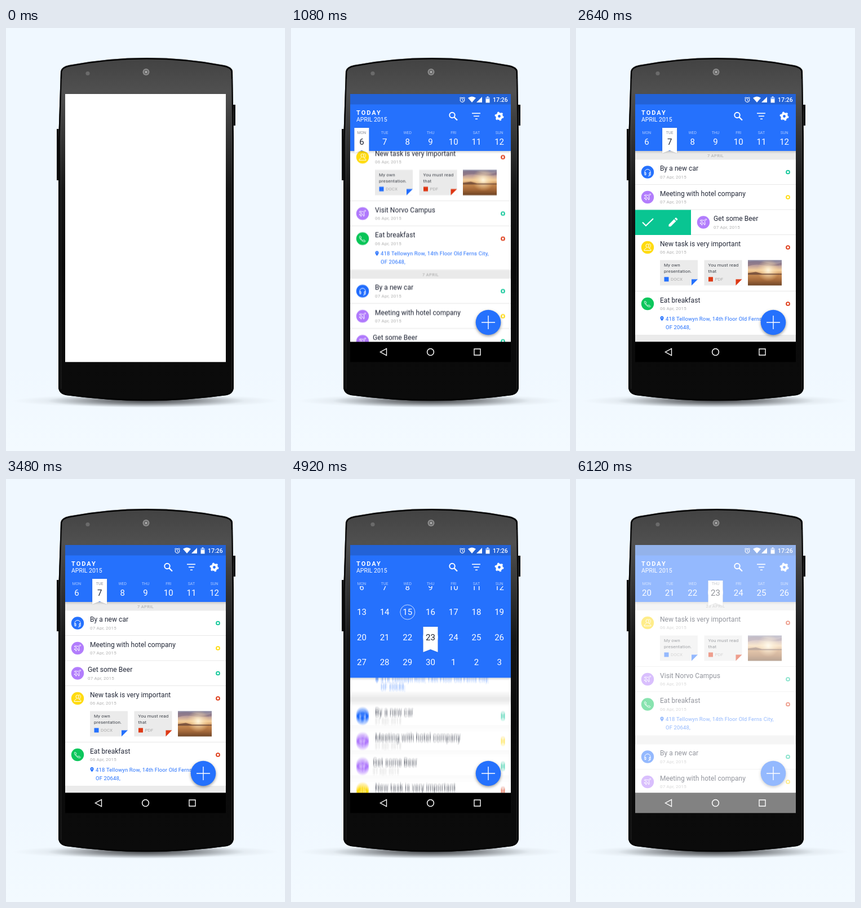
An HTML page with a canvas for the animation above (6.24 s loop, 495 px wide and 750 px high).

```html
<!DOCTYPE html>
<html lang="en">
<head>
<meta charset="utf-8">
<title>Task planner</title>
<style>
html, body { margin: 0; width: 100%; height: 100%; overflow: hidden; background: #f0f8ff; }
canvas { display: block; width: 495px; height: 750px; }
</style>
</head>
<body>
<canvas id="stage"></canvas>
<script>
const W = 495, H = 750, LOOP = 6240, STEP = 120;
const LEFT = 105, WIDTH = 285, TOP = 117, BOTTOM = 592.5, NAV = 556.5;
const BLUE = '#2571fd', RED = '#de3a16', GREEN = '#10c799', YELLOW = '#ffdb10', PURPLE = '#b27dfc';
const DAYS = ['MON', 'TUE', 'WED', 'THU', 'FRI', 'SAT', 'SUN'];
const ROW = 44.5;

const scale = window.devicePixelRatio || 1;
function prepare(canvas) {
  canvas.width = W * scale;
  canvas.height = H * scale;
  const context = canvas.getContext('2d');
  context.scale(scale, scale);
  return context;
}
const stage = prepare(document.getElementById('stage'));
const layer = prepare(document.createElement('canvas'));
let c = stage;

// Timing helpers
const clamp = k => Math.max(0, Math.min(1, k));
const part = (t, a, b) => clamp((t - a) / (b - a));
const ease = (t, a, b, power = 1) => {
  const k = part(t, a, b) ** power;
  return k * k * (3 - 2 * k);
};
const easeOut = (t, a, b) => 1 - (1 - part(t, a, b)) ** 2;

// Drawing helpers
function rect(x, y, w, h, color) {
  c.fillStyle = color;
  c.fillRect(x, y, w, h);
}
function disc(x, y, r, color) {
  c.fillStyle = color;
  c.beginPath();
  c.arc(x, y, r, 0, 7);
  c.fill();
}
function ring(x, y, r, color, width) {
  c.strokeStyle = color;
  c.lineWidth = width;
  c.beginPath();
  c.arc(x, y, r, 0, 7);
  c.stroke();
}
function path(d, x, y, color, width) {
  c.save();
  c.translate(x, y);
  const shape = new Path2D(d);
  if (width) {
    c.strokeStyle = color;
    c.lineWidth = width;
    c.stroke(shape);
  } else {
    c.fillStyle = color;
    c.fill(shape);
  }
  c.restore();
}
// y is the middle of the capital letters
function text(s, x, y, size, color, { spacing = 0, weight = 400, align = 'left' } = {}) {
  c.font = `${weight} ${size}px Roboto, sans-serif`;
  c.letterSpacing = spacing + 'px';
  c.textAlign = align;
  c.fillStyle = color;
  c.fillText(s, x, Math.round(y + size * .355));
}
function clipped(x, y, w, h, draw) {
  c.save();
  c.beginPath();
  c.rect(x, y, w, h);
  c.clip();
  draw();
  c.restore();
}
function fade(gradient, ...colors) {
  colors.forEach((color, i) => gradient.addColorStop(i / (colors.length - 1), color));
  return gradient;
}

// Task list
const GLYPHS = {
  people: 'M-3-3a2.6 3 0 1 1 5.2 0a2.6 3 0 0 1-5.2 0M-6 5.5c0-4 3.5-2.5 3.5-5M5-.5c0 2-3 .5-3 .5c0 3 4 1.5 4 5.5M-6 5.5h12M2-6c4-.5 4 3 2.5 5',
  plane: 'M5.5-5.5c-1.5-.8-3 1-4.2 2.2l-6-.8-1 1.3 4.2 2-2 2-1.8-.2-.7.9 2.2 1 1 2.2.9-.7-.2-1.8 2-2 2 4.2 1.3-1-.8-6c1.2-1.2 3.9-1.8 3.1-3.3z',
  phone: 'M-4.5-5c-2 1.5-.5 5 2 7.5s6 4 7.5 2l-2.5-2.5-1.8 1.2c-1.5-.6-3.4-2.5-4-4l1.2-1.7z',
  headset: 'M-5 2v-2a5 5 0 0 1 10 0v2M-5 1h2v4h-2zM5 1h-2v4h2zM5 5q-1 2-4 2'
};
const task = { title: 'New task is very important', date: '06', icon: 'people', color: YELLOW, mark: RED, height: 100, files: true };
const visit = { title: 'Visit Norvo Campus', date: '06', icon: 'plane', color: PURPLE, mark: GREEN };
const meal = { title: 'Eat breakfast', date: '06', icon: 'phone', color: '#0cc65c', mark: RED, height: 78, address: true };
const car = { title: 'By a new car', date: '07', icon: 'headset', color: BLUE, mark: GREEN };
const meeting = { title: 'Meeting with hotel company', date: '07', icon: 'plane', color: PURPLE, mark: YELLOW };
const beer = { title: 'Get some Beer', date: '07', icon: 'plane', color: PURPLE, mark: GREEN, x: 145 };
const bar = label => ({ label, height: 15 });
const week = [car, meeting, beer, task, meal];
const SWIPED = 7;
const rows = [bar(''), task, visit, meal, bar('7 APRIL'), ...week, bar(''), ...week,
  bar('23 APRIL'), task, visit, meal, bar(''), car, meeting, beer];

function drawCard(x, y, lines, kind, color) {
  rect(x, y, 67, 45, '#ebebeb');
  path('M56 45L67 34V45z', x, y, '#fff');
  path('M56 34H67L56 45z', x, y, color);
  lines.forEach((s, i) => text(s, x + 7, y + 9 + i * 11, 8, '#3c4048', { spacing: .2 }));
  rect(x + 7.5, y + 30, 8, 8, color);
  text(kind, x + 19, y + 34, 8, '#aaa');
}
function drawPhoto(x, y) {
  rect(x, y, 60, 45, fade(c.createLinearGradient(0, y, 0, y + 45),
    '#85849f', '#b79a9a', '#f4cf9c', '#c48750', '#a3683a', '#704728'));
  clipped(x, y, 60, 45, () => {
    path('M0 3Q20 0 34 5T60 4V9Q40 12 26 9T0 11z', x, y, 'rgba(120,100,125,.5)');
    disc(x + 36, y + 18, 20, fade(c.createRadialGradient(x + 36, y + 18, 1, x + 36, y + 18, 20),
      'rgba(255,246,220,.95)', 'rgba(255,215,150,0)'));
    path('M0 23L14 21L25 24H60V26H0z', x, y, 'rgba(90,55,45,.7)');
  });
}
function drawRow(row, y, height) {
  if (row.label !== undefined) {
    rect(LEFT, y, WIDTH, height, '#ebebeb');
    text(row.label, 247.5, y + 7.5, 7.5, '#a8a8a8', { spacing: .4, align: 'center' });
    return;
  }
  const x = row.x || 149;
  disc(127, y + 22, 11.2, row.color);
  path(GLYPHS[row.icon], 127, y + 22, '#fff', 1);
  text(row.title, x, y + 15.5, 12, '#232838', { spacing: .05 });
  text(row.date + ' Apr, 2015', x, y + 30.5, 8, '#b0b0b0', { spacing: .2 });
  ring(376, y + 22, 2.9, row.mark, 1.9);
  if (row.files) {
    drawCard(149, y + 44.5, ['My own', 'presentation.'], 'DOCX', BLUE);
    drawCard(227.5, y + 44.5, ['You must read', 'that'], 'PDF', RED);
    drawPhoto(305, y + 44.5);
  }
  if (row.address) {
    path('M0 4C-1 2-3 1-3-1.5a3 3 0 0 1 6 0C3 1 1 2 0 4zM-1-1.5a1 1 0 0 0 2 0a1 1 0 0 0-2 0z', 152.5, y + 48.5, BLUE);
    text('418 Tellowyn Row, 14th Floor Old Ferns City,', 159, y + 48.5, 9.5, BLUE, { spacing: .15 });
    text('OF 20648,', 159, y + 63.5, 9.5, BLUE, { spacing: .15 });
  }
  if (height >= ROW) rect(LEFT, y + height - 1, WIDTH, 1, '#e8e8e8');
}
function drawActions(y, width) {
  rect(LEFT, y, width, ROW, '#09c592');
  clipped(LEFT, y, width, ROW, () => {
    path('M-9 0L-3 6L10-6.5', 127, y + 22, '#fff', 2);
    path('M-7.5 7.5V4L2-5.5L5.5-2L-4 7.5zM3-6.5L4.5-8Q5.3-8.5 6-8L8-6Q8.5-5.3 8-4.5L6.5-3z', 172, y + 22, '#fff');
  });
}
function drawList(t, scroll, swipe) {
  rect(0, 0, W, H, '#fff');
  let y = 210 - scroll;
  rows.forEach((row, i) => {
    const tight = i === SWIPED && t < 1800;
    const height = tight ? 41 : row.height || ROW;
    if (y + height > 150 && y < 600) {
      const shift = i === SWIPED ? swipe : 0;
      c.save();
      c.translate(shift, 0);
      drawRow(row, y, height);
      c.restore();
      if (shift > 0) drawActions(y, shift);
    }
    y += height;
  });
}

// Header with calendar
const column = i => 125.4 + 40.7 * i;
function drawDates(bottom, shift, ink, labelInk) {
  DAYS.forEach((day, i) => text(day, column(i), 185.5, 7, labelInk, { align: 'center' }));
  clipped(LEFT, 190, WIDTH, bottom - 190, () => {
    for (let n = 0; n < 28; n++) {
      const x = column(n % 7), y = 201.2 + Math.floor(n / 7) * ROW - shift;
      const day = (n + 5) % 30 + 1;
      text(day, x, y, 15, ink, { align: 'center' });
      if (day === 15 || day === 23) ring(x, y, 13, 'rgba(255,255,255,.75)', 1);
    }
  });
}
function drawFlag(x, y, bottom, shift) {
  const flag = new Path2D(`M${x - 13} ${y}h26v45l-13-5l-13 5z`);
  c.save();
  c.shadowColor = 'rgba(0,0,0,.2)';
  c.shadowBlur = 2 * scale;
  c.fillStyle = '#fff';
  c.fill(flag);
  c.restore();
  c.save();
  c.clip(flag);
  drawDates(Math.max(bottom, y + 40), shift, '#1c2230', '#8a8f98');
  c.restore();
}
function drawToolbar() {
  rect(LEFT, TOP, WIDTH, 18.5, 'rgba(30,50,90,.24)');
  ring(304, 127.5, 3.8, '#fff', 1.2);
  path('M0-2.5V.5L2 1.5M-5-3L-2.5-5M5-3L2.5-5', 304, 127.5, '#fff', 1);
  path('M-7-3Q0-8 7-3L0 5z', 321, 127, '#fff');
  path('M-5 5H5V-5z', 334, 127, '#fff');
  path('M-3.5-4h2v-1.5h3V-4h2V5.5h-7z', 349, 127, '#fff');
  rect(345.5, 123, 7, 3, 'rgba(37,113,253,.5)');
  text('17:26', 358, 127.3, 10.5, '#fff', { weight: 500 });
  text('TODAY', 116, 150.3, 11, '#fff', { weight: 700, spacing: 2 });
  text('APRIL 2015', 116, 162, 10.5, '#fff');
  ring(286, 154.5, 4.7, '#fff', 1.9);
  path('M0 0L5.5 5.5', 289.5, 158, '#fff', 2.2);
  rect(321, 150.5, 15, 1.6, '#fff');
  rect(324, 155.5, 10, 1.6, '#fff');
  rect(327, 160.5, 4, 1.6, '#fff');
  ring(369.5, 156.5, 4.4, '#fff', 4);
  c.setLineDash([3.2, 4.13]);
  ring(369.5, 156.5, 7, '#fff', 2);
  c.setLineDash([]);
}
function drawHeader(t, bottom, shift) {
  rect(LEFT, bottom, WIDTH, 5, fade(c.createLinearGradient(0, bottom, 0, bottom + 5),
    'rgba(0,0,0,.15)', 'rgba(0,0,0,0)'));
  rect(LEFT, TOP, WIDTH, bottom - TOP, BLUE);
  drawToolbar();
  drawDates(bottom, shift, '#fff', 'rgba(255,255,255,.62)');
  const next = ease(t, 1560, 1920), jump = ease(t, 4320, 4680);
  drawFlag(column(next + 2 * jump), 177 + 95 * jump - shift * 92 / 89, bottom, shift);
}

function drawNavigation() {
  rect(LEFT, NAV, WIDTH, BOTTOM - NAV, '#000');
  path('M5.5-6V6L-5.5 0z', 164, 574.5, '#fff', 1.4);
  ring(247.5, 574.5, 5.9, '#fff', 1.5);
  path('M-5.5-5.5h11v11h-11z', 330.5, 574.5, '#fff', 1.4);
}
function drawAddButton() {
  c.save();
  c.shadowColor = 'rgba(0,0,0,.4)';
  c.shadowBlur = 5 * scale;
  c.shadowOffsetY = 2 * scale;
  disc(350, 522, 22.3, BLUE);
  c.restore();
  path('M-12 0H12M0-12V12', 350, 522, '#fff', 1.4);
}

// Phone
function groundShadow(radius, height, alpha) {
  c.save();
  c.translate(248, 661);
  c.scale(1, height / radius);
  disc(0, 0, radius, fade(c.createRadialGradient(0, 0, 0, 0, 0, radius),
    `rgba(50,52,55,${alpha})`, `rgba(60,62,65,${alpha * .55})`, 'rgba(100,105,110,0)'));
  c.restore();
}
const BODY = 'M97 77Q98 69 112 66Q180 53 250 53Q320 53 386 66Q401 69 402 77L404 200V636'
  + 'Q404 648 392 651Q320 661 249 661Q180 661 106 651Q93 648 93 636V200z';
function drawPhone() {
  rect(0, 0, W, H, fade(c.createLinearGradient(0, 600, 0, H), '#f0f8ff', '#f3faff'));
  groundShadow(236, 12, .28);
  groundShadow(175, 12, .85);
  rect(90, 179, 5, 91, '#111');
  rect(402, 136, 5, 37, '#111');
  path(BODY, 0, -1, 'rgba(190,195,200,.8)');
  const metal = c.createLinearGradient(0, 53, 0, 661);
  [[0, '#424242'], [.1, '#505050'], [.2, '#3a3a3a'], [.38, '#161616'], [.6, '#0a0a0a'], [1, '#0b0b0b']]
    .forEach(([stop, color]) => metal.addColorStop(stop, color));
  path(BODY, 0, 0, metal);
  c.save();
  c.clip(new Path2D(BODY));
  path(BODY, 0, 0, '#050505', 5);
  c.restore();
  path('M98 90V640M400.5 90V640', 0, 0, 'rgba(120,120,120,.22)', 1);
  disc(145, 80.5, 3.6, '#6a6a6a');
  disc(248.5, 78, 6, '#8f8f8f');
  disc(248.5, 78, 4.2, '#6d6d6d');
  disc(248.5, 78, 1.6, '#c4c4c4');
}

const scrollAt = t => 229 * ease(t, 840, 1920, 1.17) + 653.5 * ease(t, 4680, 5400, 1.025);

function drawScreen(t) {
  const swipe = 99 * (easeOut(t, 2040, 2640) - ease(t, 2760, 3480));
  const opened = ease(t, 3480, 4080), closed = ease(t, 4830, 5400);
  const bottom = 218 + 144 * (opened - closed);
  const shift = Math.min(89, 144 * closed);

  c = layer;
  drawList(t, scrollAt(t), swipe);
  c = stage;

  // Vertical motion blur: average of shifted copies
  const blur = scrollAt(t + 4.5) - scrollAt(t - 4.5);
  const copies = blur > .5 ? 12 : 1;
  clipped(LEFT, bottom, WIDTH, NAV - bottom, () => {
    for (let i = 0; i < copies; i++) {
      c.globalAlpha = 1 / (i + 1);
      c.drawImage(layer.canvas, 0, copies > 1 ? blur * (i / (copies - 1) - .5) : 0, W, H);
    }
  });
  c.globalAlpha = 1;

  drawHeader(t, bottom, shift);
  const drag = part(t, 3480, 3600) * (1 - part(t, 4080, 4320));
  if (drag) disc(271, bottom - 2, 16, `rgba(40,40,40,${.14 * drag})`);
  const tap = part(t, 4080, 4200) * (1 - part(t, 4200, 4440));
  if (tap) disc(column(3), 290.2, 13, `rgba(45,50,65,${.48 * tap})`);
  drawAddButton();
  drawNavigation();

  const visible = t < 6000 ? clamp(t / 600) : 1 - (t - 5880) / 470;
  rect(LEFT, TOP, WIDTH, BOTTOM - TOP, `rgba(255,255,255,${1 - visible})`);
}

function frame() {
  const t = Math.floor(performance.now() % LOOP / STEP) * STEP;
  drawPhone();
  clipped(LEFT, TOP, WIDTH, BOTTOM - TOP, () => drawScreen(t));
  requestAnimationFrame(frame);
}
frame();
</script>
</body>
</html>
```
